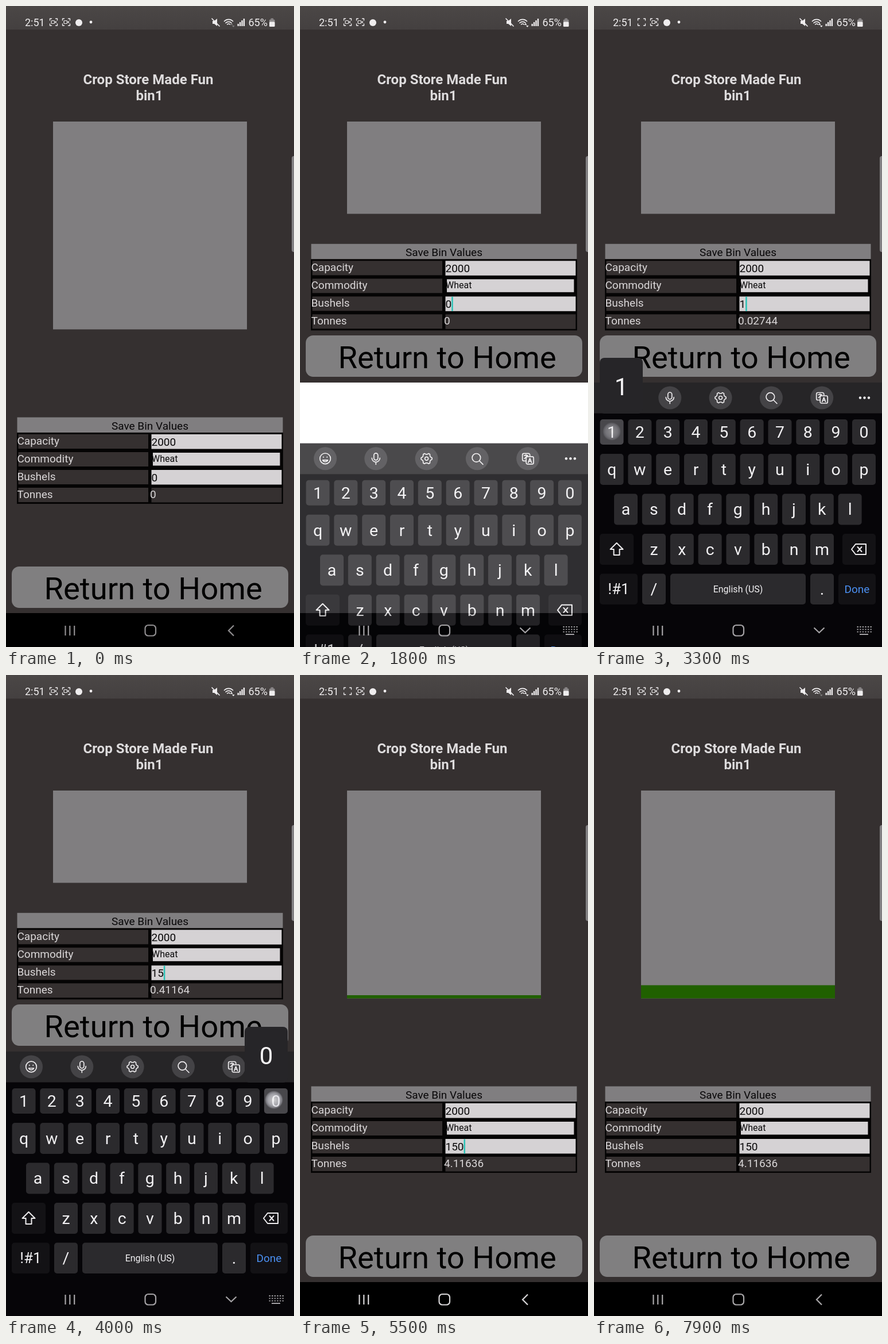
Write an HTML page that moves like this. It is 502 px wide and 1115 px high and loops after 8 s.

```html
<!DOCTYPE html>
<html lang="en">
<head>
<meta charset="utf-8">
<title>Bin values</title>
<style>
html, body { margin: 0; width: 100%; height: 100%; overflow: hidden; background: #353030; }
svg { display: block; width: 502px; height: 1115px; font-family: Roboto, Arial, sans-serif; }
.line { fill: none; stroke: #efedef; stroke-width: 1.7; stroke-linecap: round; stroke-linejoin: round; }
.mid { text-anchor: middle; }
text { white-space: pre; }
</style>
</head>
<body>
<svg id="stage" viewBox="0 0 502 1115">
  <defs>
    <radialGradient id="glow">
      <stop offset="0" stop-color="#fff" stop-opacity=".75"/>
      <stop offset=".65" stop-color="#dcdce4" stop-opacity=".6"/>
      <stop offset=".85" stop-color="#cfcfd8" stop-opacity=".4"/>
      <stop offset="1" stop-color="#cfcfd8" stop-opacity="0"/>
    </radialGradient>
    <linearGradient id="bar" x2="0" y2="1">
      <stop offset="0" stop-color="#4b4746"/><stop offset="1" stop-color="#444040"/>
    </linearGradient>
    <clipPath id="navClip"><rect y="1056" width="502" height="59"/></clipPath>
  </defs>
  <rect width="502" height="1115" fill="#353030"/>
  <rect width="502" height="41" fill="url(#bar)"/>
  <g id="status"></g>
  <g font-size="24" font-weight="700" fill="#dedcdd" class="mid">
    <text x="248" y="136">Crop Store Made Fun</text>
    <text x="250" y="164">bin1</text>
  </g>
  <rect id="bin" x="82" y="201" width="338" fill="#807e80"/>
  <rect id="grain" x="82" width="338" fill="#206000"/>
  <rect id="blank" y="655" width="502" height="401" fill="#fff"/>
  <g id="table"></g>
  <g id="home">
    <rect x="10" y="975" width="482" height="72" rx="13" fill="#807f80"/>
    <text x="66.5" y="1032" font-size="54.4">Return to Home</text>
  </g>
  <rect x="498" y="261" width="10" height="167" rx="4" fill="#828082"/>
  <rect y="1056" width="502" height="59"/>
  <g id="keyboard"></g>
  <rect id="ripple" x="317" y="1057" width="148" height="58" rx="29" fill="#77757a" clip-path="url(#navClip)"/>
  <g id="nav" fill="none" stroke-width="2.2"></g>
  <g id="popup">
    <rect y="612" width="75" height="97" rx="8" fill="#262528"/>
    <text x="37.5" y="677" font-size="42" fill="#f4f3f5" class="mid"></text>
  </g>
  <circle id="touch" r="16" fill="url(#glow)"/>
</svg>
<script>
const DURATION = 8000;
const $ = id => document.getElementById(id);
const set = (el, attrs) => { for (const k in attrs) el.setAttribute(k, attrs[k]); };
const show = (el, on) => el.setAttribute('display', on ? 'inline' : 'none');
const shift = (el, x, y) => el.setAttribute('transform', `translate(${x} ${y})`);
const clamp = v => Math.max(0, Math.min(1, v));
const rect = (x, y, w, h, fill, extra = '') =>
  `<rect x="${x}" y="${y}" width="${w}" height="${h}" fill="${fill}" ${extra}/>`;
const text = (x, y, size, fill, str, extra = '') =>
  `<text x="${x}" y="${y}" font-size="${size}" fill="${fill}" ${extra}>${str}</text>`;
const path = (d, extra = '') => `<path class="line" d="${d}" ${extra}/>`;
const at = (x, y, body) => `<g transform="translate(${x} ${y})">${body}</g>`;

function buildStatus() {
  const white = '#efedee';
  const corners = path('M-6.5 -3v-3h3M3.5 -6h3v3M6.5 3v3h-3M-3.5 6h-3v-3', 'style="stroke-width:1.3"');
  const camera = '<rect x="-4" y="-2.5" width="5.5" height="5" rx="1" fill="none" stroke="#efedee" stroke-width="1.2"/><path d="M2 0l2.6-2.4v4.8z" fill="#efedee"/>';
  let s = text(33, 35, 18, white, '2:51');
  s += at(83, 28, corners + `<g id="camera">${camera}</g>`) + at(105, 28, corners + camera);
  s += `<circle cx="127" cy="29" r="6" fill="${white}"/><circle cx="148" cy="28" r="2.4" fill="${white}"/>`;
  s += `<path d="M360 26h3l5-4v13l-5-4h-3z" fill="${white}"/>` + path('M359 22l13 13');
  s += at(388, 34, path('M-7.5 -7.5a10.5 10.5 0 0 1 15 0M-5 -4.5a7 7 0 0 1 10 0M-2.3 -2a3.2 3.2 0 0 1 4.6 0')
    + `<g id="arrows" fill="${white}"><path d="M3 -1l2.3-3 2.3 3zM6 0h4.6l-2.3 3z"/></g>`);
  for (let i = 0; i < 4; i++) s += rect(403.5 + i * 3.4, 31 - i * 3, 2.4, 4 + i * 3, white);
  s += text(422.5, 35, 18, white, '65%');
  s += rect(459, 23.5, 9.5, 12.5, '#8f8c8d', 'rx="1.5"') + rect(459, 27.5, 9.5, 8.5, white, 'rx="1.5"') + rect(461.5, 21.5, 4.5, 2, '#8f8c8d');
  $('status').innerHTML = s;
}

function buildTable() {
  const light = '#dad7d8', field = '#d5d2d4', dark = '#353030';
  let s = rect(19.5, 715.5, 463, 27, '#807e80') + text(251, 736.5, 19, '#080708', 'Save Bin Values', 'class="mid"');
  s += rect(19, 742, 464, 124, '#050404');
  ['Capacity', 'Commodity', 'Bushels', 'Tonnes'].forEach((label, i) => {
    const y = 745 + i * 31;
    s += rect(21.5, y, 226.5, 25, dark) + text(19.5, y + 17.8, 19, light, label);
    s += i === 1 ? rect(256, y + 1, 221.5, 22.5, field) : rect(253.5, y, 227, 25.5, i === 3 ? dark : field);
  });
  s += text(253.5, 765, 19, '#0a090a', '2000') + text(254, 792.5, 16, '#0a090a', 'Wheat');
  s += text(253.5, 827, 19, '#0a090a', '', 'id="bushels"') + text(251, 856, 19, light, '', 'id="tonnes"');
  s += rect(0, 807.5, 2.5, 25, '#2ac2b6', 'id="caret"');
  $('table').innerHTML = s;
}

function buildKeyboard() {
  const ink = '#f2f1f3';
  let s = rect(0, 655, 502, 470, '#060508') + rect(0, 655, 502, 53.5, '#262527');
  const key = (x, y, w, h, label, size = 28.5, fill = '#2b2a2d', color = ink) => {
    s += rect(x, y, w, h, fill, `rx="5" data-key="${label}"`)
      + text(x + w / 2, y + h / 2 + size * .35, size, color, label, 'class="mid"');
  };
  const row = (labels, x, y, h) => [...labels].forEach((c, i) => key(x + i * 48.83, y, 41, h, c));
  row('1234567890', 10.5, 719, 44);
  row('qwertyuiop', 10.5, 779, 54);
  row('asdfghjkl', 35, 848.5, 54);
  row('zxcvbnm', 84, 918, 54);
  const soft = '#131215';
  s += rect(10, 918, 59, 54, soft, 'rx="5"') + rect(433, 918, 58, 54, soft, 'rx="5" data-key="del"');
  s += at(39.5, 945, path('M0 -11l11 11h-6v10h-10v-10h-6z', 'style="stroke-width:2"'));
  s += at(462, 945, path('M-13 0l7-9h18v18h-18zM-2.5 -4l7 8M4.5 -4l-7 8', 'style="stroke-width:2"'));
  key(10, 987.5, 66, 53.5, '!#1', 26, soft);
  key(84, 987.5, 41, 53.5, '/');
  key(133, 987.5, 236, 53.5, 'English (US)', 16);
  key(377, 987.5, 41, 53.5, '.');
  key(426, 987.5, 65, 53.5, 'Done', 19, soft, '#4b90f2');

  let gear = '';
  for (let i = 0; i <= 24; i++) {
    const a = (i - .5) * Math.PI / 12, r = i % 4 < 2 ? 9.6 : 7.6;
    gear += `${i ? 'L' : 'M'}${(r * Math.cos(a)).toFixed(1)} ${(r * Math.sin(a)).toFixed(1)}`;
  }
  const ring = (r, x = 0, y = 0) => `<circle class="line" cx="${x}" cy="${y}" r="${r}"/>`;
  const icons = [
    ring(9.3) + path('M-4.5 2.5a5 5 0 0 0 9 0zM-3.2 -3v.6M3.2 -3v.6'),
    path('M-3.5 -6a3.5 3.5 0 0 1 7 0v5a3.5 3.5 0 0 1 -7 0zM-7 -1a7 7 0 0 0 14 0M0 6v4'),
    path(gear + 'z') + ring(3),
    ring(7.3, -1.5, -1.5) + path('M4 4l6 6'),
    path('M-4 4h-3a2.5 2.5 0 0 1 -2.5-2.5v-8a2.5 2.5 0 0 1 2.5-2.5h8a2.5 2.5 0 0 1 2.5 2.5v2M-6.5 -5.5h6.5M-3.3 -7v1.5M-1 -5l-5 5')
      + '<rect class="line" x="-3" y="-3.5" width="13" height="13" rx="2.5"/>' + path('M.5 7l3-7.5 3 7.5M1.5 4.5h4')
  ];
  icons.forEach((icon, i) => {
    s += at(44 + i * 88.3, 681.5, '<circle r="20" fill="#444346"/>' + icon);
  });
  for (let i = -1; i < 2; i++) s += `<circle cx="${471.5 + i * 7.5}" cy="681.5" r="2.2" fill="${ink}"/>`;
  $('keyboard').innerHTML = s;
}

function buildNav() {
  let dots = '';
  for (let r = 0; r < 3; r++) for (let c = 0; c < 6; c++) dots += `M${458.5 + c * 4.6} ${1080 + r * 4.3}h2.4`;
  $('nav').innerHTML = '<path d="M103.5 1078v17M111.3 1078v17M119.2 1078v17"/>'
    + '<rect x="242.5" y="1077" width="18.5" height="18.5" rx="5.5"/>'
    + '<path id="back" d="M397 1077.5l-9 9 9 9"/>'
    + `<g id="hide"><path d="M383.5 1081.5l9 8.5 9-8.5"/><path stroke-width="1.8" d="M463 1093h15${dots}"/></g>`;
}

const entries = [[0, '0'], [2400, ''], [3300, '1'], [3700, '15'], [4100, '150']];
const presses = [
  { from: 1300, to: 1500, x: 366, y: 820 },
  { from: 2300, to: 2700, x: 468, y: 938, key: 'del' },
  { from: 3200, to: 3400, x: 31, y: 740, key: '1', popup: 10 },
  { from: 3600, to: 3800, x: 226, y: 740, key: '5', popup: 188 },
  { from: 3900, to: 4200, x: 467, y: 739, key: '0', popup: 416 },
  { from: 4600, to: 5000, x: 388, y: 1092 }
];
const OPEN = 1600, CLOSE = 4800, FOCUS = 1400;

function draw(t) {
  const compact = t >= OPEN && t < CLOSE;
  set($('bin'), { height: compact ? 160.5 : 361.5 });
  shift($('table'), 0, compact ? -301.7 : 0);
  shift($('home'), 0, compact ? -402 : 0);
  show($('blank'), compact);

  const fill = t < CLOSE ? 0 : Math.max(0, (t - 4740) * .00725);
  set($('grain'), { y: 562.5 - fill, height: fill });

  const [typedAt, value] = entries.filter(e => e[0] <= t).pop();
  $('bushels').textContent = value;
  $('tonnes').textContent = +value ? (value * .02744242).toFixed(5) : '0';
  const sinceInput = t - Math.max(FOCUS, typedAt);
  show($('caret'), sinceInput >= 0 && sinceInput % 1000 < 500);
  set($('caret'), { x: 253.5 + value.length * 10.67 });

  // The keyboard slides and fades over the app and the black navigation bar.
  const opening = clamp((t - OPEN) / 400), closing = clamp((t - CLOSE) / 300);
  const offset = closing ? 460 * closing ** 1.3 : 460 * (1 - opening) ** 2.12;
  const alpha = closing ? 1 - 1.6 * closing : opening * 1.66;
  shift($('keyboard'), 0, offset);
  set($('keyboard'), { opacity: clamp(alpha) });

  const press = presses.find(p => t >= p.from && t < p.to);
  show($('touch'), press);
  if (press) {
    shift($('touch'), press.x, press.y);
    set($('touch'), { opacity: clamp((press.to - t) / 200) });
  }
  for (const k of ['del', '1', '5', '0']) {
    const [idle, pressed] = k === 'del' ? ['#131215', '#5a595d'] : ['#2b2a2d', '#48474b'];
    set(document.querySelector(`[data-key="${k}"]`), { fill: press && press.key === k ? pressed : idle });
  }
  const popped = press && press.popup !== undefined;
  show($('popup'), popped);
  if (popped) {
    shift($('popup'), press.popup, 0);
    $('popup').lastElementChild.textContent = press.key;
  }

  set($('ripple'), { opacity: t < 4600 ? 0 : .3 * clamp((5300 - t) / 400) });
  set($('nav'), { stroke: t < FOCUS ? '#8f8d8f' : t < CLOSE ? '#a5a3a6' : t < 7000 ? '#d8d6d8' : '#aaa8aa' });
  show($('back'), !compact);
  show($('hide'), compact);
  show($('camera'), t % 1000 < 300 || t % 1000 >= 800);
  set($('arrows'), { opacity: t < 1300 || t >= 7000 ? .35 : 1 });
}

buildStatus();
buildTable();
buildKeyboard();
buildNav();

const start = performance.now();
function tick() {
  const t = (performance.now() - start) % DURATION;
  draw(Math.floor(t / 100) * 100);
  requestAnimationFrame(tick);
}
tick();
</script>
</body>
</html>
```
